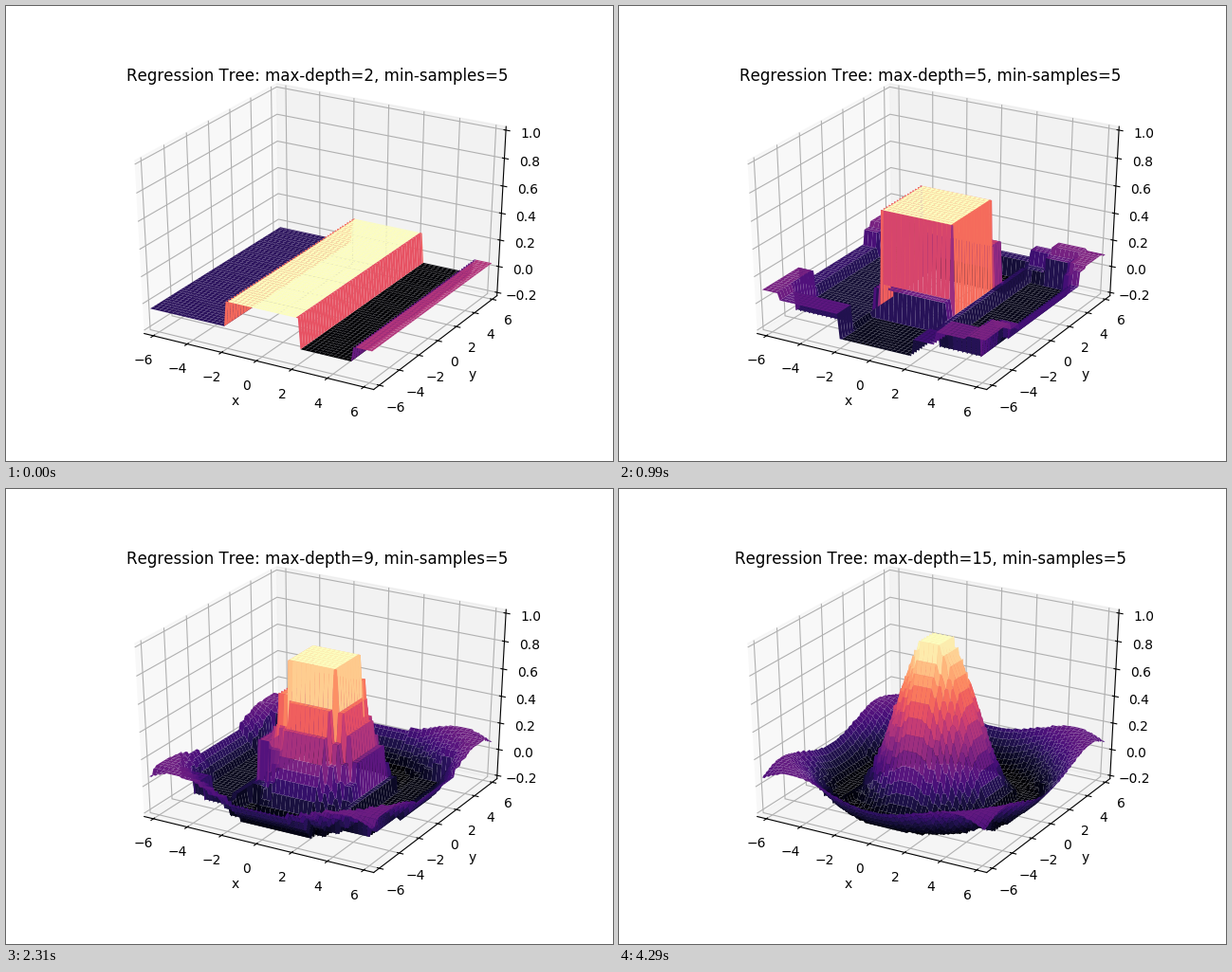
Animation, 640 px wide and 480 px high, one loop 4.62 s. Source, as a matplotlib script:

```python
import numpy as np
import matplotlib.pyplot as plt
from matplotlib.animation import FuncAnimation

SPAN = 2 * np.pi
Z_MIN, Z_MAX = -0.2, 1.0
POINTS = 100
DEPTHS = range(2, 16)
MIN_SAMPLES = 5
TIE = 1e-9

plt.rcParams["font.family"] = "DejaVu Sans"
plt.rcParams["text.kerning_factor"] = 6

side = np.linspace(-SPAN, SPAN, POINTS)
X, Y = np.meshgrid(side, side)
radius = np.hypot(X, Y).ravel()
heights = np.sin(radius) / radius
features = (X.ravel(), Y.ravel())
levels = np.zeros((max(DEPTHS) + 1, heights.size))


def best_split(ids):
    """Split with the least squared error; ties go to the largest threshold."""
    best_gain, best_parts = -np.inf, None
    for feature in features:
        order = ids[np.argsort(feature[ids], kind="stable")]
        values = feature[order]
        cuts = np.flatnonzero(np.diff(values) > TIE) + 1
        if not cuts.size:
            continue
        sums = np.cumsum(heights[order])
        left = sums[cuts - 1]
        right = sums[-1] - left
        gain = left**2 / cuts + right**2 / (len(ids) - cuts)
        pick = np.flatnonzero(gain >= gain.max() - TIE)[-1]
        if gain[pick] > best_gain + TIE:
            best_gain = gain[pick]
            best_parts = order[:cuts[pick]], order[cuts[pick]:]
    return best_parts


def grow(ids, depth=0):
    """Store the prediction of a node for its own depth and all deeper ones."""
    levels[depth:, ids] = heights[ids].mean()
    if depth == max(DEPTHS) or len(ids) < MIN_SAMPLES:
        return
    for part in best_split(ids) or ():
        grow(part, depth + 1)


def projection(elev=30, azim=-60, dist=10):
    """Perspective view of the data box scaled to a unit cube."""
    el, az = np.radians([elev, azim])
    toward = np.array([np.cos(el) * np.cos(az), np.cos(el) * np.sin(az), np.sin(el)])
    right = np.array([-np.sin(az), np.cos(az), 0])
    up = np.cross(toward, right)

    low = np.array([-SPAN, -SPAN, Z_MIN])
    size = np.array([SPAN, SPAN, Z_MAX]) - low
    world = np.diag([*(1 / size), 1])
    world[:3, 3] = -low / size

    view = np.eye(4)
    view[:3, :3] = right, up, toward
    view[:3, 3] = -view[:3, :3] @ (0.5 + dist * toward)

    perspective = np.diag([1.0, 1.0, 0.0, 0.0])
    perspective[2, 3] = -dist
    perspective[3, 2] = -1
    return perspective @ view @ world


def padded(low, high):
    pad = (high - low) / 48
    return low - pad, high + pad


grow(np.arange(heights.size))

fig = plt.figure(figsize=(6.4, 4.8), dpi=100)
ax = fig.add_subplot(projection="3d")

# Fill the whole subplot rectangle instead of a centred square.
view_matrix = projection()
ax.get_proj = lambda: view_matrix
ax.apply_aspect = lambda position=None: None

ax.set_xlim(*padded(-SPAN, SPAN))
ax.set_ylim(*padded(-SPAN, SPAN))
ax.set_zlim(*padded(Z_MIN, Z_MAX))
ax.set_xticks(range(-6, 7, 2))
ax.set_yticks(range(-6, 7, 2))
ax.set_zticks(np.arange(-1, 6) * 0.2)
ax.set_xlabel("x")
ax.set_ylabel("y")


def draw(depth):
    for surface in list(ax.collections):
        surface.remove()
    # Each patch spans two grid steps and keeps the points on its border.
    ax.plot_surface(X, Y, levels[depth].reshape(X.shape), cmap="magma",
                    rstride=2, cstride=2)
    ax.set_title(f"Regression Tree: max-depth={depth}, min-samples={MIN_SAMPLES}",
                 y=1.0)


anim = FuncAnimation(fig, draw, frames=DEPTHS, interval=330,
                     repeat=True, repeat_delay=0)
plt.show()
```
